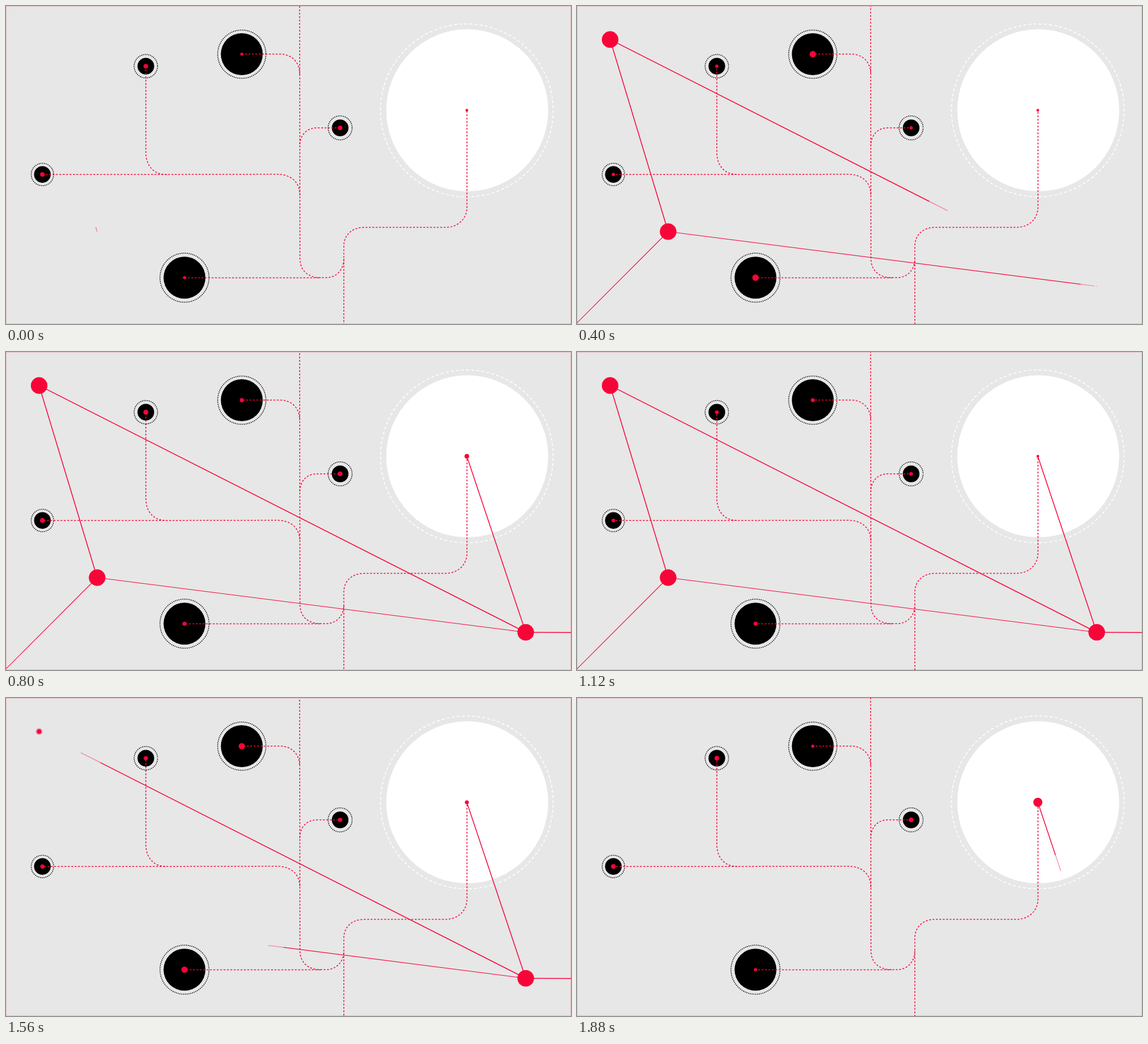
Animation, 998 px wide and 561 px high, one loop 1920 ms. Source, as an HTML page with a canvas:

```html
<!DOCTYPE html>
<html lang="en">
<head>
<meta charset="utf-8">
<title>Network</title>
<style>
  html, body { margin: 0; width: 100%; height: 100%; overflow: hidden; background: #e7e7e7; }
  canvas { display: block; width: 998px; height: 561px; }
</style>
</head>
<body>
<canvas id="stage" width="998" height="561"></canvas>
<script>
const ctx = document.getElementById('stage').getContext('2d');
const W = 998, H = 561, LOOP = 1920, STEP = 40, BLUR = 13;
const RED = '#f70539', NODE_R = 14.6;

const A = [58.5, 59.2], B = [161, 398], D = [918, 494.5], E = [814, 184];

// x, y, disc radius, ring radius
const discs = [
  [416.5, 85, 37, 42.6],
  [315.3, 479.3, 37, 43.3],
  [247, 106.2, 14.7, 20.7],
  [64.3, 297.2, 14.7, 19.8],
  [590.2, 215, 14.7, 21.2]
];

const routes = [
  'M518.6 0 L519.3 446 C519.3 466 533 479.3 556 479.3 H565 C584 479.3 596.7 465 596.7 446 V424 C596.7 404 611 390.5 633 390.5 H776 C798 390.5 814.3 376 814.3 354 V184',
  'M596.7 446 V561',
  'M416.5 84.7 H483 C504 84.7 518.7 98 518.7 120',
  'M247 106 V258 C247 281 260 297.4 284 297.4',
  'M64.3 297.2 H284 L478 296.8 C502 296.8 519 309 519 334',
  'M590 215 H549 C531 215 519 228 519 247',
  'M315.3 479.4 H556'
].map(d => new Path2D(d));

// from, to, width, draw start/end, erase start/end, erased from the far end
const links = [
  { from: B, to: A, w: 1.5, on: [-4, 155], off: [1395, 1515] },
  { from: B, to: [-2, 561], w: 1.15, on: [20, 130], off: [1295, 1395], back: true },
  { from: B, to: D, w: 1.2, on: [0, 402], off: [1400, 1768] },
  { from: A, to: D, w: 1.5, on: [160, 506], off: [1519, 1845] },
  { from: D, to: [998, 494.8], w: 1.5, on: [420, 545], off: [1590, 1680], back: true },
  { from: D, to: E, w: 1.5, on: [420, 590], off: [1780, 1923] }
];

// place, growth window, shrink window
const nodes = [
  [B, [10, 110], [1390, 1475]],
  [A, [150, 250], [1490, 1585]],
  [D, [395, 490], [1765, 1850]]
];

const hubKeys = [
  [0, 2.4], [420, 2.4], [600, 3.5], [760, 4.4], [800, 4.2], [960, 3.4], [1100, 2.4],
  [1340, 2.4], [1560, 3.5], [1740, 4.4], [1830, 9.5], [1880, 8], [1920, 2.4]
];

const ramp = (t, [a, b]) => Math.min(1, Math.max(0, (t - a) / (b - a)));
const mix = (a, b, p) => a + (b - a) * p;
const wave = (t, mean, amp, peak) => mean + amp * Math.cos((t - peak) * 2 * Math.PI / 960);

function keyed(keys, t) {
  const i = Math.max(1, keys.findIndex(k => k[0] >= t));
  const [t0, v0] = keys[i - 1], [t1, v1] = keys[i];
  return mix(v0, v1, (t - t0) / (t1 - t0));
}

function dot(x, y, r, color) {
  if (r <= 0) return;
  ctx.fillStyle = color;
  ctx.beginPath();
  ctx.arc(x, y, r, 0, 2 * Math.PI);
  ctx.fill();
}

// Dashes are fitted so that they close evenly around the ring.
function ring(x, y, r, color, width, dash, gap, turn) {
  const len = 2 * Math.PI * r;
  const fit = len / Math.round(len / (dash + gap)) / (dash + gap);
  ctx.strokeStyle = color;
  ctx.lineWidth = width;
  ctx.setLineDash([dash * fit, gap * fit]);
  ctx.lineDashOffset = -turn * (dash + gap) * fit;
  ctx.beginPath();
  ctx.arc(x, y, r, 0, 2 * Math.PI);
  ctx.stroke();
  ctx.setLineDash([]);
}

function part({ from, to, w }, p, q, alpha) {
  if (q - p < 1e-4) return;
  ctx.globalAlpha = alpha;
  ctx.strokeStyle = RED;
  ctx.lineWidth = w;
  ctx.beginPath();
  ctx.moveTo(mix(from[0], to[0], p), mix(from[1], to[1], p));
  ctx.lineTo(mix(from[0], to[0], q), mix(from[1], to[1], q));
  ctx.stroke();
  ctx.globalAlpha = 1;
}

function span(link, t) {
  const gone = ramp(t, link.off);
  return link.back
    ? [0, Math.min(ramp(t, link.on), 1 - gone)]
    : [gone, ramp(t, link.on)];
}

// The stretch a tip sweeps within one exposure is paler.
function drawLink(link, t) {
  const [p0, q0] = span(link, t - BLUR), [p1, q1] = span(link, t);
  const p = Math.max(p0, p1), q = Math.min(q0, q1);
  part(link, p, q, 1);
  part(link, Math.min(p0, p1), p, 0.42);
  part(link, q, Math.max(q0, q1), 0.42);
}

function drawNode([[x, y], grow, shrink], t) {
  const size = u => NODE_R * Math.min(ramp(u, grow), 1 - ramp(u, shrink));
  const r0 = size(t - BLUR), r1 = size(t);
  ctx.globalAlpha = 0.4;
  dot(x, y, Math.max(r0, r1), RED);
  ctx.globalAlpha = 1;
  dot(x, y, Math.min(r0, r1), RED);
}

function draw(t) {
  const turn = t / LOOP * 8;
  ctx.fillStyle = '#e7e7e7';
  ctx.fillRect(0, 0, W, H);
  ctx.strokeStyle = '#dfbcc5';
  ctx.lineWidth = 1;
  ctx.strokeRect(0.5, 0.5, W - 1, H - 1);

  dot(814.7, 184.1, 143, '#fff');
  ring(814, 184.1, 152.5, '#fff', 1.6, 5, 4, turn);
  for (const [x, y, r, outer] of discs) {
    dot(x, y, r, '#000');
    ring(x, y, outer, '#000', 1.5, 1.6, 1.6, turn);
  }

  ctx.strokeStyle = RED;
  ctx.lineWidth = 1.5;
  ctx.setLineDash([3.2, 2.8]);
  ctx.lineDashOffset = -turn * 6;
  for (const path of routes) ctx.stroke(path);
  ctx.setLineDash([]);

  for (const link of links) drawLink(link, t);
  for (const node of nodes) drawNode(node, t);

  for (const [x, y, r] of discs) {
    dot(x, y, r > 20 ? wave(t, 4.35, 1.6, 490) : wave(t, 3.6, 0.75, 820), RED);
  }
  dot(E[0], E[1], keyed(hubKeys, t), RED);
}

const start = performance.now();
function tick() {
  const t = Math.max(0, performance.now() - start) % LOOP;
  draw(Math.floor(t / STEP) * STEP);
  requestAnimationFrame(tick);
}
tick();
</script>
</body>
</html>
```
